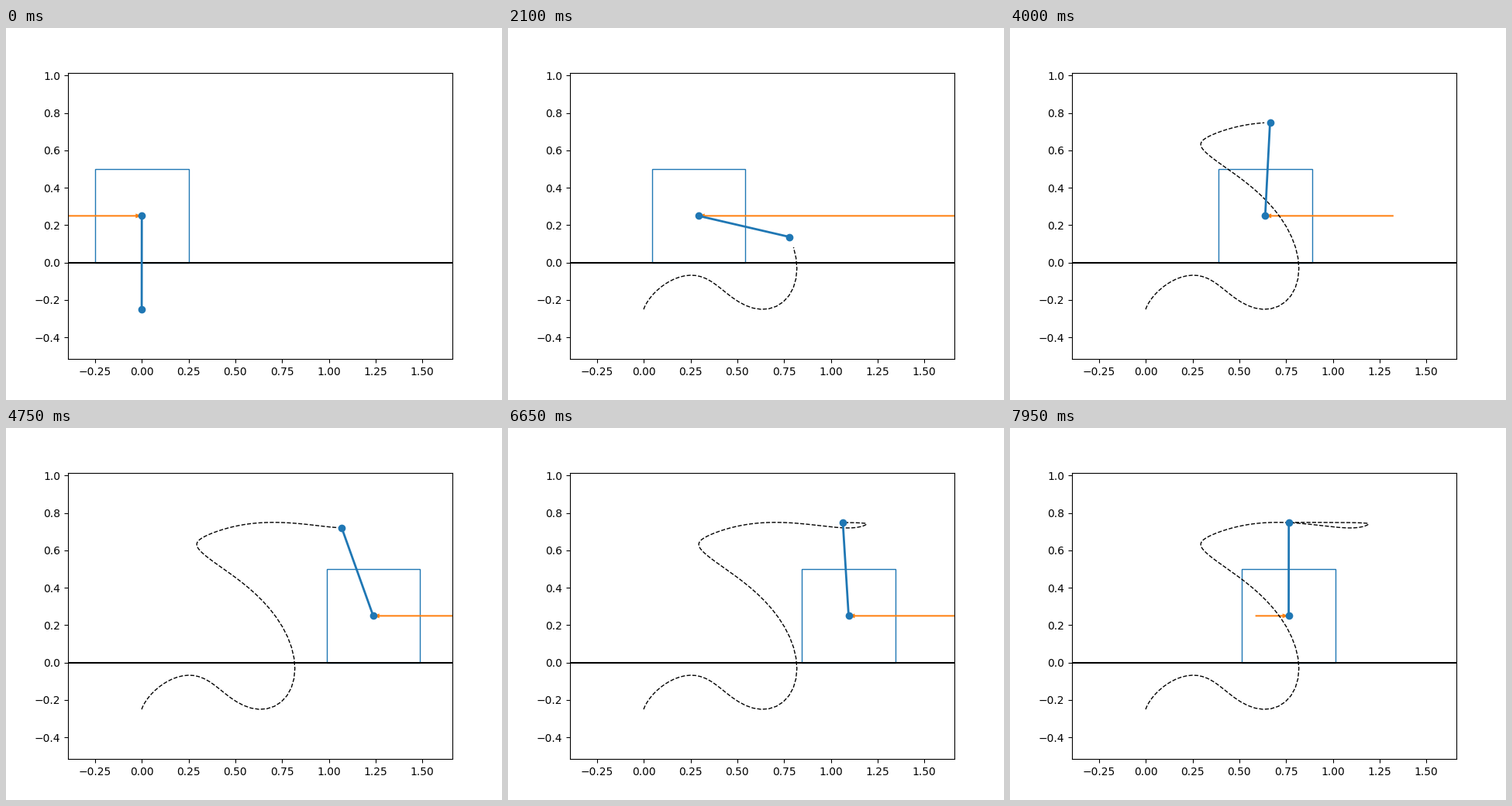
A matplotlib script for the animation above (8 s loop, 640 by 480 pixels).

```python
import numpy as np
import matplotlib.pyplot as plt
from matplotlib.animation import FuncAnimation
from matplotlib.patches import Rectangle

FRAMES, FRAME_MS = 160, 50
N = FRAMES + 3              # a few spare steps for the differences at the end
H = 0.02                    # simulated seconds per frame
L, G = 0.5, 9.81            # pole length, gravity
CART, BOB = 1.0, 0.3        # masses
SIDE = 0.5
PIVOT = SIDE / 2
END_FORCE = 0.178

# key poses: screen time (s), cart position, pole angle from hanging (deg)
POSES = np.array([
    (0.00, 0.000, 0.0), (0.80, 0.495, -45.3), (0.85, 0.533, -48.0),
    (1.70, 0.582, 14.8), (2.10, 0.2915, 77.2), (2.55, 0.0225, 116.5),
    (3.20, 0.000, 143.8), (3.40, 0.096, 149.2), (4.25, 0.887, 187.2),
    (4.75, 1.2365, 200.0), (5.95, 1.228, 187.4), (6.65, 1.0955, 183.6),
    (7.65, 0.8445, 180.4), (7.95, 0.7635, 180.0),
])
# where the cart turns back: screen time (s), position
TURNS = np.array([(1.32, 0.727), (2.83, -0.045), (5.15, 1.311)])


def to_frame(seconds):
    return np.rint(seconds * 1000 / FRAME_MS).astype(int)


pose_i, pose_x, pose_a = to_frame(POSES[:, 0]), POSES[:, 1], np.radians(POSES[:, 2])
turn_i, turn_x = to_frame(TURNS[:, 0]), TURNS[:, 1]


def accel(v):
    return np.diff(v, 2) / H**2


def force(x, a):
    mid, spin = a[1:-1], (a[2:] - a[:-2]) / (2 * H)
    f = (CART + BOB) * accel(x)
    f += BOB * L * (accel(a) * np.cos(mid) - spin**2 * np.sin(mid))
    return np.concatenate([[2 * f[0] - f[1]], f, f[-1:]])


def residual(z):
    x, a = z[:N], z[N:]
    ax, aa = accel(x), accel(a)
    pole = L * aa + ax * np.cos(a[1:-1]) + G * np.sin(a[1:-1])
    rest = [v[1] - v[0] - acc[0] * H**2 / 2 for v, acc in ((x, ax), (a, aa))]
    return np.concatenate([
        pole / 0.1,
        np.diff(ax) / H / 100,
        np.array(rest) / 1e-4,
        (x[pose_i] - pose_x) / 0.003,
        (a[pose_i] - pose_a) / 0.009,
        (x[turn_i] - turn_x) / 0.003,
        [(force(x, a)[FRAMES - 1] - END_FORCE) / 0.03],
    ])


def first_guess(values, width=9):
    v = np.interp(np.arange(N), pose_i, values)
    for _ in range(2):
        v = np.convolve(np.pad(v, width // 2, mode="edge"),
                        np.ones(width) / width, "valid")
    return v


def solve_motion(rounds=30, eps=1e-6):
    """Gauss-Newton: the smoothest cart motion whose pole swings through the poses."""
    z = np.concatenate([first_guess(pose_x), first_guess(pose_a)])
    for _ in range(rounds):
        r = residual(z)
        jac = np.empty((r.size, z.size))
        for k in range(z.size):
            moved = z.copy()
            moved[k] += eps
            jac[:, k] = (residual(moved) - r) / eps
        move = np.linalg.lstsq(jac, -r, rcond=None)[0]
        z = z + np.clip(move, -0.2, 0.2)
        if np.abs(move).max() < 1e-5:
            break
    return z[:N], z[N:]


cart_x, angle = solve_motion()
bob_x, bob_y = cart_x + L * np.sin(angle), PIVOT - L * np.cos(angle)
push = force(cart_x, angle)

fig, ax = plt.subplots(figsize=(6.4, 4.8), dpi=100)
cart = ax.add_patch(Rectangle((-SIDE / 2, 0), SIDE, SIDE, fill=False, ec="C0", lw=1))
arrow = ax.quiver([0], [PIVOT], [1], [0], color="C1", pivot="tip",
                  scale_units="xy", scale=1, width=0.004,
                  headwidth=3, headlength=4, headaxislength=4)
ax.axhline(0, color="k", lw=1.5)
trace, = ax.plot([], [], "k--", lw=1)
pole, = ax.plot([], [], "o-", color="C0", lw=2)
ax.set_xlim(-0.395, 1.661)
ax.set_ylim(PIVOT - 0.766, PIVOT + 0.766)


def draw(i):
    x = cart_x[i]
    cart.set_x(x - SIDE / 2)
    arrow.set_offsets([[x, PIVOT]])
    arrow.set_UVC([push[i]], [0])
    trace.set_data(bob_x[:i], bob_y[:i])
    pole.set_data([x, bob_x[i]], [PIVOT, bob_y[i]])
    return cart, arrow, trace, pole


anim = FuncAnimation(fig, draw, frames=FRAMES, interval=FRAME_MS,
                     init_func=lambda: draw(0), repeat=True)
plt.show()
```
